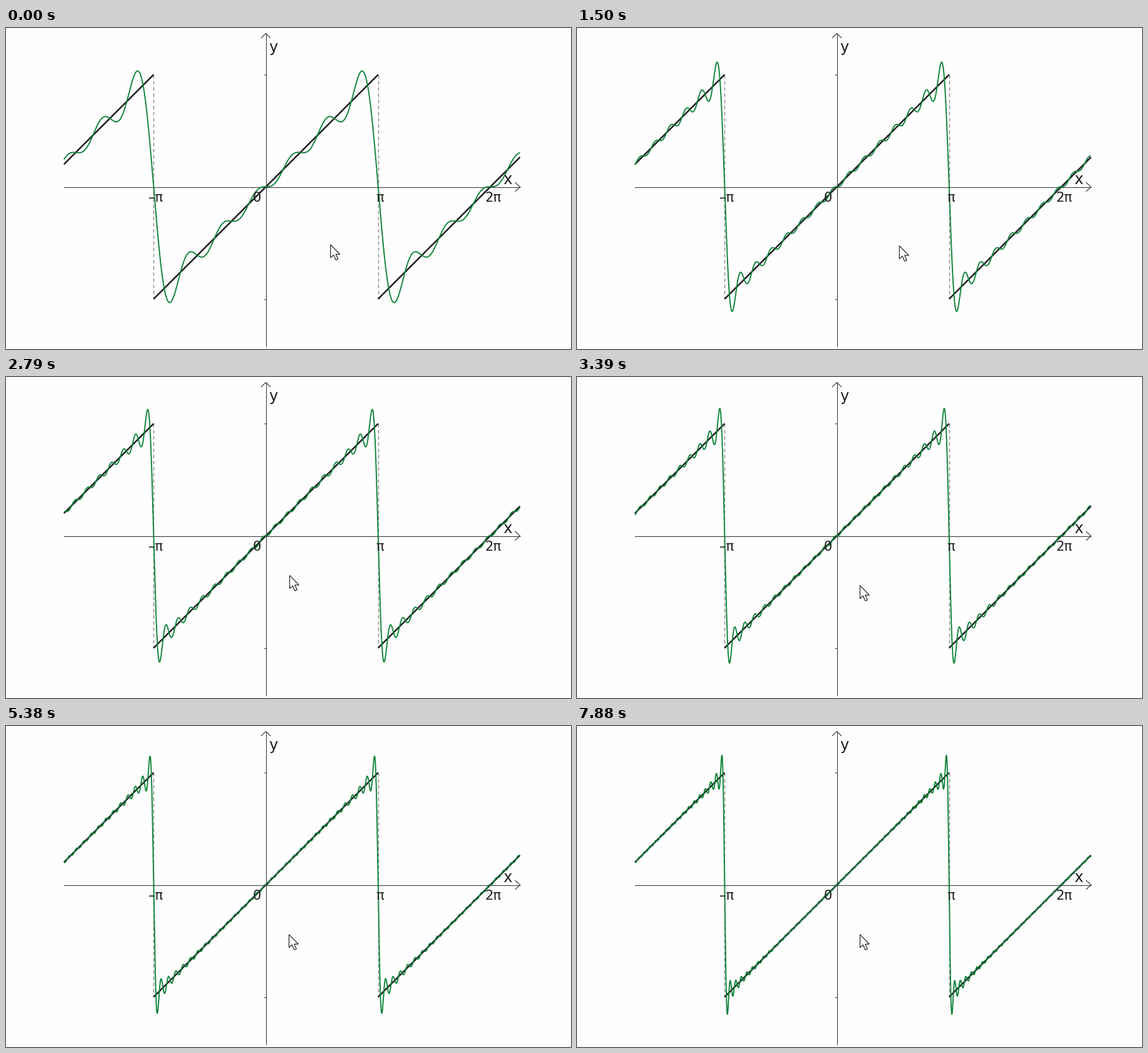
A matplotlib script for the animation above (8 s loop, 897 by 510 pixels).

```python
import numpy as np
import matplotlib.pyplot as plt
from matplotlib.animation import FuncAnimation
from matplotlib.patches import Polygon

W, H, DPI = 897, 510, 64
PX = 72 / DPI                       # points per pixel
LOOP, STEP = 8000, 20               # ms
OX, OY, UNIT = 412.6, 252.3, 178.2  # origin and pixels per pi
LEFT, RIGHT = 92, 816

INK, AXIS, GREY, GREEN = "#1e1e1e", "#3c3c3c", "#8a8a8a", "#0e8439"

fig = plt.figure(figsize=(W / DPI, H / DPI), dpi=DPI, facecolor="#fefefe")
ax = fig.add_axes([0, 0, 1, 1])
ax.set_xlim(0, W)
ax.set_ylim(H, 0)
ax.axis("off")


def line(xs, ys, color, width, **kw):
    return ax.plot(xs, ys, color=color, lw=width * PX, **kw)[0]


def label(x, y, text, size=21):
    ax.text(x, y, text, color=INK, fontsize=size * PX, family="DejaVu Sans",
            ha="left", va="baseline", zorder=6)


def draw_axes():
    ax_x, ax_y = 412.5, 252.5
    line([LEFT, RIGHT], [ax_y, ax_y], AXIS, 1.1)
    line([ax_x, ax_x], [9, 506], AXIS, 1.1)
    line([RIGHT - 7.5, RIGHT, RIGHT - 7.5], [ax_y - 7, ax_y, ax_y + 7], AXIS, 1.2)
    line([ax_x - 7, ax_x, ax_x + 7], [15.5, 8.5, 15.5], AXIS, 1.2)
    for y in (OY - UNIT, OY + UNIT):
        line([ax_x - 3, ax_x], [y, y], AXIS, 1.1)
    label(226, 276, "–π")
    label(391.5, 276, "0")
    label(587, 276, "π")
    label(760, 276, "2π")
    label(789.5, 247.5, "x", 24)
    label(417.5, 38.3, "y", 24)


def draw_sawtooth():
    for x in (OX - UNIT, OX + UNIT):
        line([x, x], [OY - UNIT, OY + UNIT], GREY, 1.4,
             dashes=(4, 3), dash_capstyle="butt", zorder=2.5)
    for k in (-2, 0, 2):
        mid = OX + k * UNIT
        xs = np.clip([mid - UNIT, mid + UNIT], LEFT, RIGHT)
        line(xs, OY - (xs - mid), INK, 2.5, zorder=3, solid_capstyle="butt")


def fourier(n):
    """Partial sum of the sawtooth, in pixels."""
    t = (X - OX) / UNIT * np.pi
    k = np.arange(1, n + 1)[:, None]
    s = (2 * (-1.0) ** (k + 1) / k * np.sin(k * t)).sum(axis=0)
    return OY - s * UNIT / np.pi


def terms_at(t):
    # two terms join about every 480 ms, later about every 500 ms
    return 6 + 2 * int(np.interp(t, [-450, 3390, 7880], [0, 8, 17]))


def pointer_at(t):
    # two drags with a rest between them
    times = [1420, 1500, 2160, 2390, 2790, 3050]
    x = np.interp(t, times, [515.3, 512.3, 478, 478, 450.3, 449.3])
    y = np.interp(t, times, [344.3, 346.3, 330, 330, 315.3, 331.3])
    return x, y


X = np.linspace(LEFT, RIGHT, 2897)
draw_axes()
draw_sawtooth()
curve = line(X, fourier(6), GREEN, 1.9, zorder=4, solid_capstyle="butt")

arrow = np.array([(0, 0), (0, 20.8), (4.8, 16.4), (8.4, 24.4),
                  (11.8, 22.9), (8.3, 15.2), (14.8, 15.2)])
pointer = ax.add_patch(Polygon(arrow, closed=True, fc="white", ec="#101018",
                               lw=1.1 * PX, joinstyle="miter", zorder=8))


def update(i):
    t = (i + 0.5) * STEP
    curve.set_ydata(fourier(terms_at(t)))
    pointer.set_xy(arrow + pointer_at(t))
    return curve, pointer


anim = FuncAnimation(fig, update, frames=LOOP // STEP, interval=STEP,
                     repeat=True, repeat_delay=0, blit=False)
plt.show()
```
